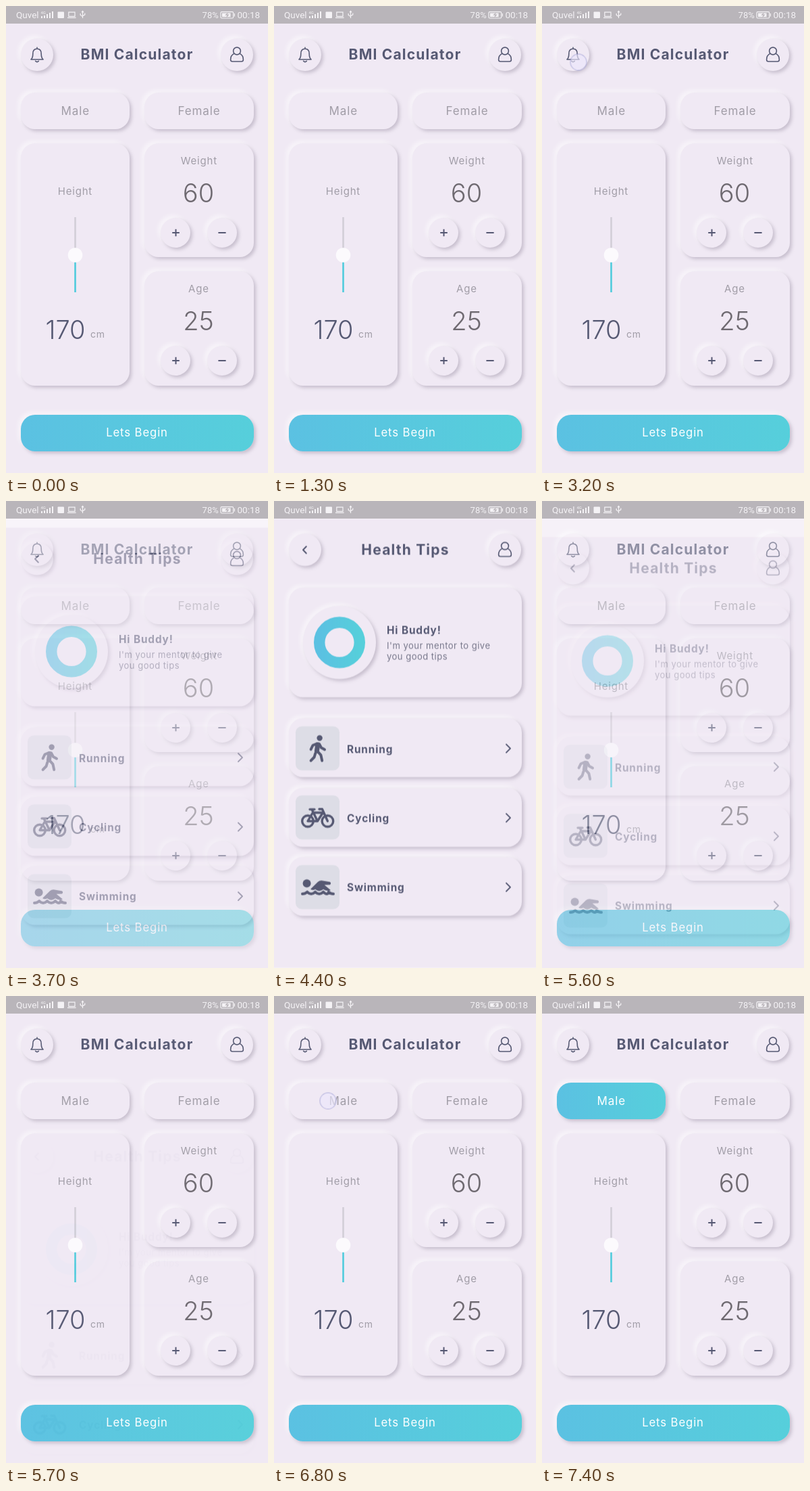
An HTML page that plays this animation: 388 by 690 pixels, repeating every 8000 ms.

```html
<!DOCTYPE html>
<html lang="en">
<head>
<meta charset="utf-8">
<title>BMI Calculator</title>
<style>
  :root { --bg: #f0e9f4; --ink: #565973; --label: #a19da7; --num: #6e6970; --loop: 8s linear infinite; }
  html, body { margin: 0; width: 100%; height: 100%; overflow: hidden; background: var(--bg); }
  #stage { position: relative; width: 388px; height: 690px; overflow: hidden; background: var(--bg); }
  .layer { position: absolute; inset: 0; width: 388px; height: 690px; }

  /* raised surfaces */
  .card, .round {
    position: absolute; left: var(--x); top: var(--y); width: var(--w); height: var(--h);
    border-radius: 21px; background: var(--bg);
    box-shadow: 3px 3px 5px rgba(130, 118, 140, .36), -4px -4px 6px rgba(255, 255, 255, .5);
  }
  .round { width: var(--d); height: var(--d); border-radius: 50%; }
  .fill { background: linear-gradient(90deg, #5bc1e2, #56cfdb); }
  .tile { position: absolute; left: 32px; top: var(--y); width: 65px; height: 65px; border-radius: 9px; background: #dddde6; }

  /* type */
  text { font-family: Inter, "Open Sans", sans-serif; fill: var(--label); }
  .mid { text-anchor: middle; }
  .title { font-size: 21px; font-weight: 700; letter-spacing: 1.2px; fill: var(--ink); }
  .btn { font-size: 17px; letter-spacing: .9px; }
  .lab { font-size: 15px; letter-spacing: .8px; }
  .num { font-size: 38px; font-weight: 350; fill: var(--num); }
  .strong { font-size: 15.3px; font-weight: 700; letter-spacing: .9px; fill: var(--ink); }
  .body { font-size: 13px; letter-spacing: .5px; fill: #77778b; }
  .bar text { font: 13.5px Roboto, sans-serif; fill: #f4f2f5; }

  /* icons */
  .line { fill: none; stroke: var(--ink); stroke-width: 2; stroke-linecap: round; stroke-linejoin: round; }
  .thin { stroke-width: 1.6; }
  .thick { stroke-width: 4; }
  .solid { fill: var(--ink); }
  .bar { background: #b9b5ba; height: 26px; }

  /* motion */
  #tips { background: #fff; opacity: 0; animation: fade var(--loop); }
  #sheet { animation: slide var(--loop); }
  #sheet::before { content: ""; position: absolute; inset: 26px 0 0; background: var(--bg); }
  #picked { box-shadow: none; opacity: 0; animation: pick var(--loop); }
  #male { animation: whiten var(--loop); }
  #touch {
    position: absolute; left: -12.5px; top: -12.5px; width: 25px; height: 25px; box-sizing: border-box;
    border: 1.5px solid rgba(138, 138, 200, .6); border-radius: 50%; background: rgba(236, 231, 252, .65);
    opacity: 0; animation: tap 8s step-end infinite;
  }
  @keyframes fade {
    0% { opacity: 0; }
    43.75% { opacity: 0; animation-timing-function: cubic-bezier(.42, 0, 1, 1); }
    47.5% { opacity: 1; }
    68.75% { opacity: 1; animation-timing-function: cubic-bezier(0, 0, .58, 1); }
    71.625%, 100% { opacity: 0; }
  }
  @keyframes slide {
    0% { transform: translateY(172.5px); }
    43.75% { transform: translateY(172.5px); animation-timing-function: cubic-bezier(.4, 0, .2, 1); }
    47.5% { transform: none; }
    68.75% { transform: none; animation-timing-function: cubic-bezier(.8, 0, .6, 1); }
    71.625%, 100% { transform: translateY(172.5px); }
  }
  @keyframes pick { 0%, 87.5% { opacity: 0; } 88.75%, 100% { opacity: 1; } }
  @keyframes whiten { 0%, 87.5% { fill: var(--label); } 88.75%, 100% { fill: #fff; } }
  @keyframes tap {
    0% { opacity: 0; transform: none; }
    40% { opacity: 1; transform: translate(53.5px, 82.5px); }
    43.75% { opacity: 0; }
    63.75% { opacity: 1; transform: translate(46.5px, 77.5px); }
    66.25% { opacity: 0; }
    85% { opacity: 1; transform: translate(79.5px, 154.5px); }
    87.5%, 100% { opacity: 0; transform: translate(79.5px, 154.5px); }
  }
</style>
</head>
<body>
<div id="stage">

  <div class="layer">
    <div class="round" style="--x:22px;--y:48px;--d:48px"></div>
    <div class="round" style="--x:318px;--y:48px;--d:48px"></div>
    <div class="card" style="--x:22px;--y:128px;--w:161px;--h:54px"></div>
    <div class="card fill" id="picked" style="--x:22px;--y:128px;--w:161px;--h:54px"></div>
    <div class="card" style="--x:205px;--y:128px;--w:162px;--h:54px"></div>
    <div class="card" style="--x:22px;--y:203px;--w:161px;--h:358px"></div>
    <div class="card" style="--x:205px;--y:203px;--w:162px;--h:168px"></div>
    <div class="card" style="--x:205px;--y:392px;--w:162px;--h:169px"></div>
    <div class="round" style="--x:229px;--y:313px;--d:44px"></div>
    <div class="round" style="--x:298px;--y:313px;--d:44px"></div>
    <div class="round" style="--x:229px;--y:502px;--d:44px"></div>
    <div class="round" style="--x:298px;--y:502px;--d:44px"></div>
    <div class="card fill" style="--x:22px;--y:604px;--w:345px;--h:54px"></div>
    <svg class="layer" viewBox="0 0 388 690">
      <defs>
        <g id="user" class="line thin">
          <circle cx="342" cy="66.5" r="5.4"/>
          <path d="M337.6 70.4Q332.6 73 332.6 79.2Q332.6 82 335.5 82H348.5Q351.4 82 351.4 79.2Q351.4 73 346.4 70.4"/>
        </g>
        <g id="steps" class="line">
          <path d="M246.2 335h10.6M251.5 329.7v10.6M314.4 335h11.2" stroke-linecap="butt"/>
        </g>
      </defs>
      <path class="line thin" d="M37 79C39.6 77 39.8 74.5 39.8 70.5C39.8 66 42 63.2 46 63.2S52.2 66 52.2 70.5C52.2 74.5 52.4 77 55 79ZM46 63v-1.6M43.6 81.3Q46 84 48.4 81.3"/>
      <use href="#user"/>
      <text class="title mid" x="194" y="79.3">BMI Calculator</text>
      <text class="btn mid" id="male" x="102.8" y="161">Male</text>
      <text class="btn mid" x="286" y="161">Female</text>
      <text class="lab mid" x="102.4" y="279">Height</text>
      <text class="lab mid" x="285.8" y="234">Weight</text>
      <text class="lab mid" x="285.4" y="423">Age</text>
      <text class="num mid" x="285" y="290">60</text>
      <text class="num mid" x="285" y="479">25</text>
      <text class="num mid" x="88" y="491.5" style="fill:var(--ink)">170</text>
      <text x="125" y="489.5" font-size="14" letter-spacing=".8">cm</text>
      <text class="btn mid" x="194" y="636.3" style="fill:#fff;font-size:16.7px">Lets Begin</text>
      <path d="M102.5 312v56" stroke="#d3ced7" stroke-width="2.6"/>
      <path d="M102.5 368v55" stroke="#50cbdc" stroke-width="2.6"/>
      <circle cx="102.5" cy="368" r="10.8" fill="#fcfafd"/>
      <use href="#steps"/>
      <use href="#steps" y="189"/>
    </svg>
  </div>

  <div class="layer" id="tips">
    <div class="layer" id="sheet">
      <div class="round" style="--x:22px;--y:48px;--d:48px"></div>
      <div class="round" style="--x:318px;--y:48px;--d:48px"></div>
      <div class="card" style="--x:22px;--y:128px;--w:345px;--h:162px"></div>
      <div class="round" style="--x:43px;--y:155px;--d:108px"></div>
      <div class="card" style="--x:22px;--y:321px;--w:345px;--h:87px"></div>
      <div class="card" style="--x:22px;--y:424px;--w:345px;--h:87px"></div>
      <div class="card" style="--x:22px;--y:526px;--w:345px;--h:87px"></div>
      <div class="tile" style="--y:333px"></div>
      <div class="tile" style="--y:435px"></div>
      <div class="tile" style="--y:538px"></div>
      <svg class="layer" viewBox="0 0 388 690">
        <defs>
          <linearGradient id="aqua"><stop stop-color="#5bc1e2"/><stop offset="1" stop-color="#56cfdb"/></linearGradient>
          <path id="next" class="line" d="M344 359.6l6 6-6 6"/>
        </defs>
        <path class="line" d="M47.8 67.2l-4.8 5 4.8 5"/>
        <use href="#user"/>
        <text class="title mid" x="194.5" y="79.3">Health Tips</text>
        <circle cx="97" cy="209" r="29.8" fill="none" stroke="url(#aqua)" stroke-width="16.4"/>
        <text class="strong" x="167" y="196.3">Hi Buddy!</text>
        <text class="body" x="167" y="218">I'm your mentor to give</text>
        <text class="body" x="167" y="234.3">you good tips</text>
        <text class="strong" x="108" y="372">Running</text>
        <text class="strong" x="108" y="474.3">Cycling</text>
        <text class="strong" x="108" y="576.7">Swimming</text>
        <use href="#next"/>
        <use href="#next" y="102.5"/>
        <use href="#next" y="205"/>

        <!-- walker -->
        <circle class="solid" cx="67.6" cy="350.2" r="4.2"/>
        <path class="line thick" d="M63.5 358.6L57.5 361L54.6 367M67 359L70 364.5L75 367.2M65.5 371L69.4 375.4L71.2 383.6M61.2 373L59.6 378.5L54.6 383.6"/>
        <path class="line" stroke-width="7" style="stroke-width:7" d="M64.8 360L63.4 369.4"/>

        <!-- bicycle -->
        <g class="line" style="stroke-width:3.4">
          <circle cx="50" cy="473" r="8.3"/>
          <circle cx="79.4" cy="473" r="8.3"/>
          <path d="M50 473L57.4 460.5H72.4L64.4 473ZM64.4 473L56.4 456.4M53 455.6H60M67 455.2H71.4L79.4 473"/>
        </g>

        <!-- swimmer -->
        <circle class="solid" cx="48.6" cy="565" r="6"/>
        <path class="solid" d="M54 573.4L65 562.8Q68 560 72 560.9L82.5 562.8Q85.6 564.4 83 567L74.6 567.2L84 575Q78 577.4 73 573.8Q67 578.6 61 573.8Q57.5 576 54 573.4Z"/>
        <path class="line thick" d="M42 580.6Q46 580.6 49.2 577.6Q55 583.4 61 577.6Q67 583.4 73 577.6Q79 583.4 81 577.6Q84 580.6 88 580.6"/>
      </svg>
    </div>
  </div>

  <div id="touch"></div>

  <svg class="layer bar" viewBox="0 0 388 26" style="height:26px">
    <text x="15" y="18">Quvel</text>
    <text x="51.5" y="12" style="font-size:6px">4G</text>
    <path d="M53 18v-3M57 18v-4M61 18v-6M65 18v-8M69 18v-10" stroke="#f4f2f5" stroke-width="2"/>
    <rect x="76.5" y="8.5" width="9.5" height="9.5" rx="1" fill="#f4f2f5"/>
    <g fill="none" stroke="#f4f2f5" stroke-width="1.2">
      <path d="M92.8 15.4V9.2H102V15.4ZM91 17.4h12.6"/>
      <path d="M113.5 8v10M110.2 11v2.4l3.3 2M116.8 10.4v2.4l-3.3 2M112 9.4l1.5-2 1.5 2"/>
      <rect x="318" y="8.6" width="18.6" height="9.4" rx="1.5"/>
      <path d="M338.4 11v4.6"/>
    </g>
    <rect x="320" y="10.5" width="12.5" height="5.6" fill="#f4f2f5"/>
    <path d="M329.4 8.8l-5.2 5h3.2l-1.6 4 5-5.2h-3.2Z" fill="#b9b5ba"/>
    <text x="290.6" y="18" style="font-size:13px">78%</text>
    <text x="342.5" y="18">00:18</text>
  </svg>
</div>
</body>
</html>
```
